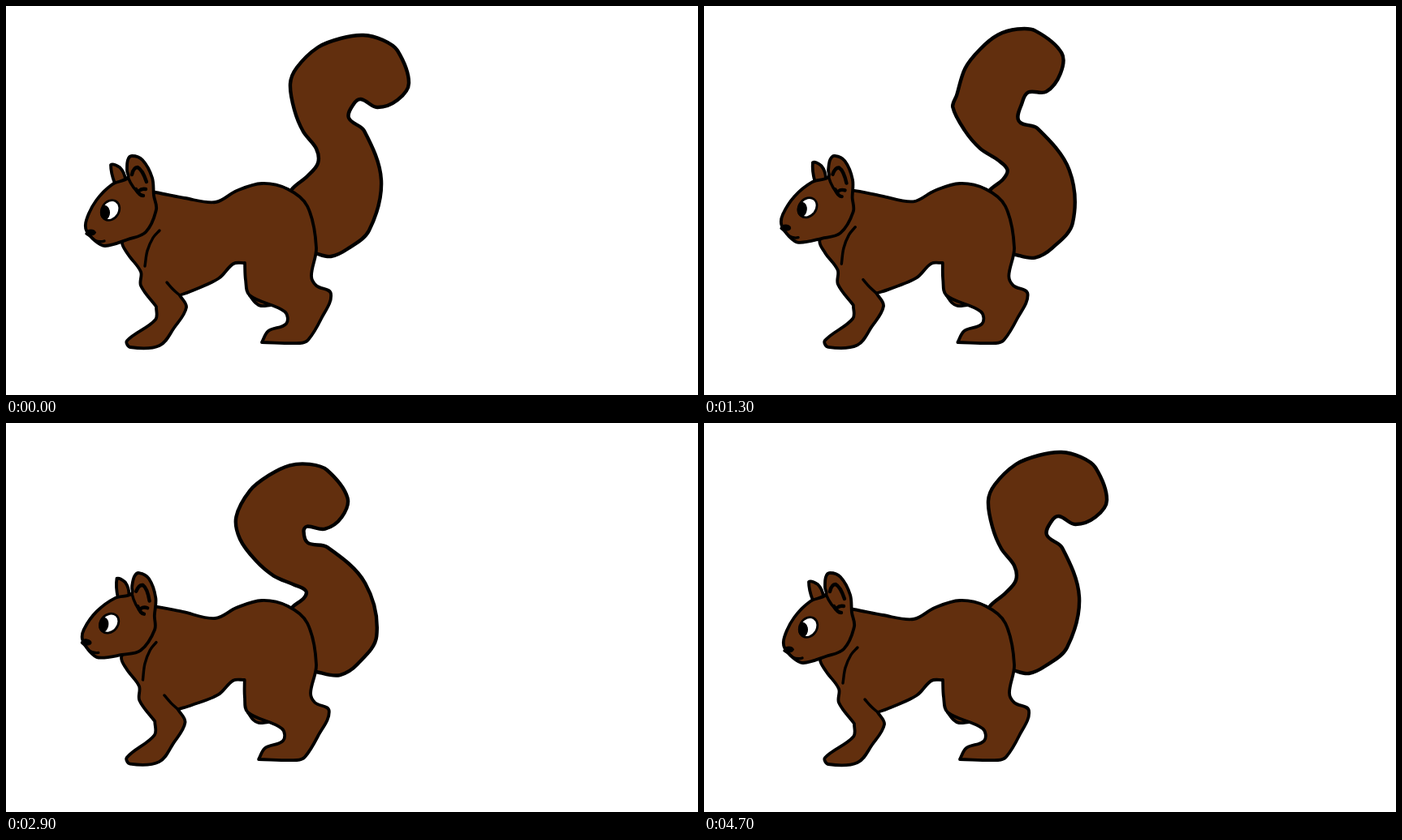
An HTML page that plays this animation: 852 px wide and 480 px high, repeating every 4800 ms.

```html
<!DOCTYPE html>
<html lang="en">
<head>
<meta charset="utf-8">
<title>Squirrel</title>
<style>
  html, body { margin: 0; width: 100%; height: 100%; overflow: hidden; background: #fff; }
  svg { display: block; width: 100vw; height: 100vh; }
  path, ellipse { stroke: #000; stroke-linecap: round; stroke-linejoin: round; }
  .fur { fill: #622f0e; stroke-width: 3.8; }
  .line { fill: none; stroke-width: 3.4; }
  .bold { stroke-width: 4.4; }
</style>
</head>
<body>
<svg viewBox="0 0 852 480">
  <path id="tail" class="fur bold"/>
  <path id="heel" class="fur"/>
  <path id="body" class="fur"/>
  <path id="shoulder" class="line"/>
  <path id="elbow" class="line"/>
  <g id="head">
    <path class="fur" d="M134 219Q129 206 129 196Q132 194 140 199Q146 205 147 214"/>
    <path id="face" class="fur"/>
    <path class="line" d="M150 211Q156 226 167 234"/>
    <path class="line bold" d="M155 208Q157 199 162 199Q168 202 173 217"/>
    <path class="line bold" d="M160 226Q164 234 169 234M164 228Q167 225 172 226"/>
    <ellipse cx="128.5" cy="252" rx="10.5" ry="13" fill="#fff" stroke-width="2.8" transform="rotate(32 128.5 252)"/>
    <ellipse cx="122" cy="255" rx="5.5" ry="8.5" stroke-width="1"/>
    <ellipse cx="104.5" cy="279.5" rx="6" ry="3.5" stroke-width="1"/>
    <path class="line" d="M99 281Q105 284 109 289Q115 292 121 290"/>
  </g>
</svg>
<script>
const FRAME = 100, LOOP = 4800, SWING = 4700;

// Key points of the resting pose; a repeated point makes a corner
const POINTS = {
  tail: `345,240 353,225 371,210 384,194 382,176 366,155 355,128 350,96 358,76 384,51 412,40 440,36
    464,42 482,55 496,95 482,116 457,125 437,115 428,121 422,138 441,154 462,215 447,277
    420,300 400,309 384,306 360,296`,
  body: `168,229 184,230 220,237 258,242 284,228 315,219 347,226 371,247 382,298 376,333 382,345
    400,355 388,386 372,412 362,416 315,415 315,415 323,401 345,392 343,377 300,357 295,338
    294,317 294,317 280,318 262,336 230,351 214,357 214,357 222,372 207,397 189,419 153,421
    149,413 184,387 185,371 185,371 166,345 166,328 150,306 143,290 158,270`,
  shoulder: '171,321 174,302 181,286 189,277',
  elbow: '198,341 206,350 214,357',
  heel: '300,357 307,366 314,370 326,369',
  face: `150,212 131,220 111,240 99,264 99,277 110,290 122,296 150,288 172,279 185,251 182,234
    180,212 168,190 155,185 150,190 149,203`
};
const OPEN = ['shoulder', 'elbow', 'heel'];
for (const id in POINTS) POINTS[id] = POINTS[id].split(/\s+/).map(pair => pair.split(',').map(Number));

const HIP = [375, 260], TAIL_PIVOT = [417, 247], TIP_PIVOT = [403, 74];

const dist = (a, b) => Math.hypot(a[0] - b[0], a[1] - b[1]);
const ease = u => (1 - Math.cos(Math.PI * Math.min(1, Math.max(0, u)))) / 2;
const ramp = (from, to, v) => ease((v - from) / (to - from));

// Counterclockwise turn on screen
function turn([x, y], [cx, cy], angle) {
  const c = Math.cos(angle), s = Math.sin(angle);
  return [cx + (x - cx) * c + (y - cy) * s, cy + (y - cy) * c - (x - cx) * s];
}

// The tip bends on its own joint, then the tail turns with a soft root
function bendTail(pt, swing, lift) {
  const tipShare = ramp(150, 225, pt[0] - 2 * pt[1]);
  const tailShare = ramp(30, 90, dist(pt, HIP));
  const bent = turn(pt, TIP_PIVOT, (0.45 * lift - 0.2 * swing) * tipShare);
  return turn(bent, TAIL_PIVOT, 0.546 * swing * tailShare);
}

// The chest is pulled up and back while the hind foot slides
function shiftBody([x, y], swing) {
  const chest = Math.exp(-(((x - 200) / 45) ** 2) - ((y - 290) / 90) ** 2);
  const foot = ramp(250, 310, x) * ramp(300, 400, y);
  return [x - swing * (5 * chest + 4.5 * foot), y - swing * 8 * chest];
}

// Smooth curve whose handles follow the length of each segment
function curve(pts, closed) {
  const n = pts.length;
  const at = i => pts[closed ? (i + n) % n : Math.min(n - 1, Math.max(0, i))];
  const handle = (p, from, to, length) => {
    const k = length / 3 / (dist(from, to) || 1);
    return [p[0] + (to[0] - from[0]) * k, p[1] + (to[1] - from[1]) * k];
  };
  let d = 'M' + at(0);
  for (let i = 0; i < (closed ? n : n - 1); i++) {
    const [a, b, c, e] = [at(i - 1), at(i), at(i + 1), at(i + 2)];
    const length = dist(b, c);
    if (length) d += `C${handle(b, a, c, length)} ${handle(c, e, b, length)} ${c}`;
  }
  return closed ? d + 'Z' : d;
}

function show(id, warp) {
  const d = curve(POINTS[id].map(warp), !OPEN.includes(id));
  document.getElementById(id).setAttribute('d', d);
}

function draw(time) {
  const t = Math.floor(time % LOOP / FRAME) * FRAME;
  const swing = ease(t < SWING / 2 ? 2 * t / SWING : 2 - 2 * t / SWING);
  const lift = t < 750 ? ease(t / 750) : 1 - ease((t - 750) / 1600);
  show('tail', pt => bendTail(pt, swing, lift));
  for (const id of ['body', ...OPEN]) show(id, pt => shiftBody(pt, swing));
  document.getElementById('head').setAttribute('transform', `rotate(${10.4 * swing} 159 241)`);
}

show('face', pt => pt);
const start = performance.now();
function tick() {
  draw(performance.now() - start);
  requestAnimationFrame(tick);
}
tick();
</script>
</body>
</html>
```
